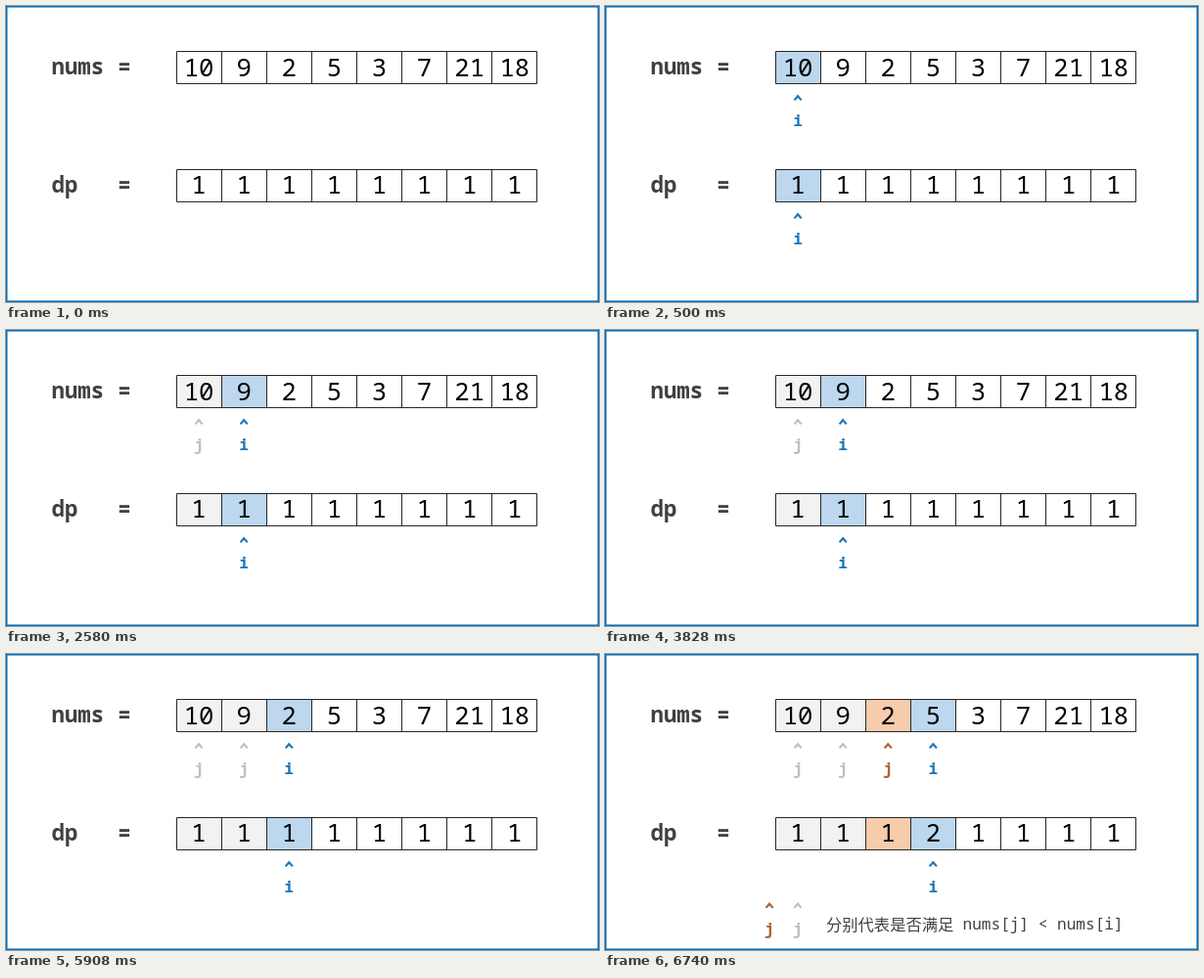
Animation of 606x303 px, one loop 8 s. Source, as an HTML page:

```html
<!DOCTYPE html>
<html lang="zh">
<head>
<meta charset="utf-8">
<title>dp table</title>
<style>
  html, body { margin: 0; width: 100%; height: 100%; overflow: hidden; background: #fff; }
  svg { display: block; width: 100vw; height: 100vh; }
  text { font-family: "Noto Sans Mono", "DejaVu Sans Mono", monospace; }
  .label { font-size: 22.3px; font-weight: 700; fill: #404040; }
  .num { font-size: 25.6px; text-anchor: middle; fill: #000; }
  .mark { font-size: 16.4px; font-weight: 700; text-anchor: middle; }
  .caret { fill: none; stroke-width: 2.2; }
  .note { font-size: 16.1px; fill: #404040; }
  .cjk { font-family: "Noto Sans CJK SC", "Noto Sans CJK", sans-serif; font-size: 16.3px; }
  .grid { fill: none; stroke: #262626; stroke-width: 1; }
  .scene { visibility: hidden; animation: 8s step-end infinite; }
  #s0 { animation-name: start; }
  #s1 { animation-name: first; }
  #s2 { animation-name: second; }
  #s3 { animation-name: third; }
  #s4 { animation-name: fourth; }
  @keyframes start { 0% { visibility: visible } 6.25%, 100% { visibility: hidden } }
  @keyframes first { 0% { visibility: hidden } 6.25% { visibility: visible } 32.25%, 100% { visibility: hidden } }
  @keyframes second { 0% { visibility: hidden } 32.25% { visibility: visible } 58.25%, 100% { visibility: hidden } }
  @keyframes third { 0% { visibility: hidden } 58.25% { visibility: visible } 84.25%, 100% { visibility: hidden } }
  @keyframes fourth { 0% { visibility: hidden } 84.25%, 100% { visibility: visible } }
</style>
</head>
<body>
<svg id="stage" viewBox="0 0 606 303"></svg>
<script>
  const LEFT = 174, CELL = 46.1, HEIGHT = 33;
  const NUMS_Y = 46.5, DP_Y = 167;
  const BLUE = { fill: '#bdd7ee', ink: '#1f77b8' };
  const GREY = { fill: '#f2f2f2', ink: '#bfbfbf' };
  const ORANGE = { fill: '#f8cbad', ink: '#ad6533' };

  const nums = [10, 9, 2, 5, 3, 7, 21, 18];
  const ones = nums.map(() => 1);

  // Each scene lists the styles of its leading cells; the last one is i.
  const scenes = [
    { cells: [], dp: ones },
    { cells: [BLUE], dp: ones },
    { cells: [GREY, BLUE], dp: ones },
    { cells: [GREY, GREY, BLUE], dp: ones },
    { cells: [GREY, GREY, ORANGE, BLUE], dp: [1, 1, 1, 2, 1, 1, 1, 1], legend: true }
  ];

  const edge = k => LEFT + CELL * k;
  const center = k => edge(k + 0.5);
  const snap = v => Math.floor(v) + 0.5;

  const text = (cls, x, y, value) => `<text class="${cls}" x="${x}" y="${y}">${value}</text>`;

  const values = (list, y) =>
    list.map((v, k) => text('num', center(k), y + 25, v)).join('');

  function grid(y) {
    const top = snap(y), bottom = top + HEIGHT;
    let d = `M${snap(LEFT)} ${top}H${snap(edge(8))}V${bottom}H${snap(LEFT)}Z`;
    for (let k = 1; k < 8; k++) d += `M${snap(edge(k))} ${top}V${bottom}`;
    return `<path class="grid" d="${d}"/>`;
  }

  function pointer(x, y, letter, ink) {
    return `<path class="caret" stroke="${ink}" d="M${x - 3.6} ${y + 5.4}L${x} ${y + 1.2}L${x + 3.6} ${y + 5.4}"/>`
      + `<text class="mark" x="${x}" y="${y + 32}" fill="${ink}">${letter}</text>`;
  }

  function shade(k, y, color) {
    const x = snap(edge(k));
    return `<rect x="${x}" y="${snap(y)}" width="${snap(edge(k + 1)) - x}" height="${HEIGHT}" fill="${color}"/>`;
  }

  const legend = () =>
    pointer(168, 254.5, 'j', ORANGE.ink) + pointer(197, 254.5, 'j', GREY.ink)
    + text('note cjk', 226, 282.5, '分别代表是否满足')
    + text('note', 365.5, 282, 'nums[j] &lt; nums[i]');

  function scene({ cells, dp, legend: hasLegend }, id) {
    const last = cells.length - 1;
    let out = '';
    cells.forEach((style, k) => {
      out += shade(k, NUMS_Y, style.fill) + shade(k, DP_Y, style.fill);
      out += pointer(center(k), 91, k === last ? 'i' : 'j', style.ink);
      if (k === last) out += pointer(center(k), 212, 'i', style.ink);
    });
    out += values(dp, DP_Y);
    if (hasLegend) out += legend();
    return `<g class="scene" id="s${id}">${out}</g>`;
  }

  document.getElementById('stage').innerHTML =
    '<rect x=".75" y=".75" width="604.5" height="301.5" fill="#fff" stroke="#0070c0" stroke-width="1.5"/>'
    + scenes.map(scene).join('')
    + grid(NUMS_Y) + grid(DP_Y)
    + values(nums, NUMS_Y)
    + text('label', 46.6, 70, 'nums') + text('label', 114.2, 70, '=')
    + text('label', 46.6, 190.5, 'dp') + text('label', 114.2, 190.5, '=');
</script>
</body>
</html>
```
